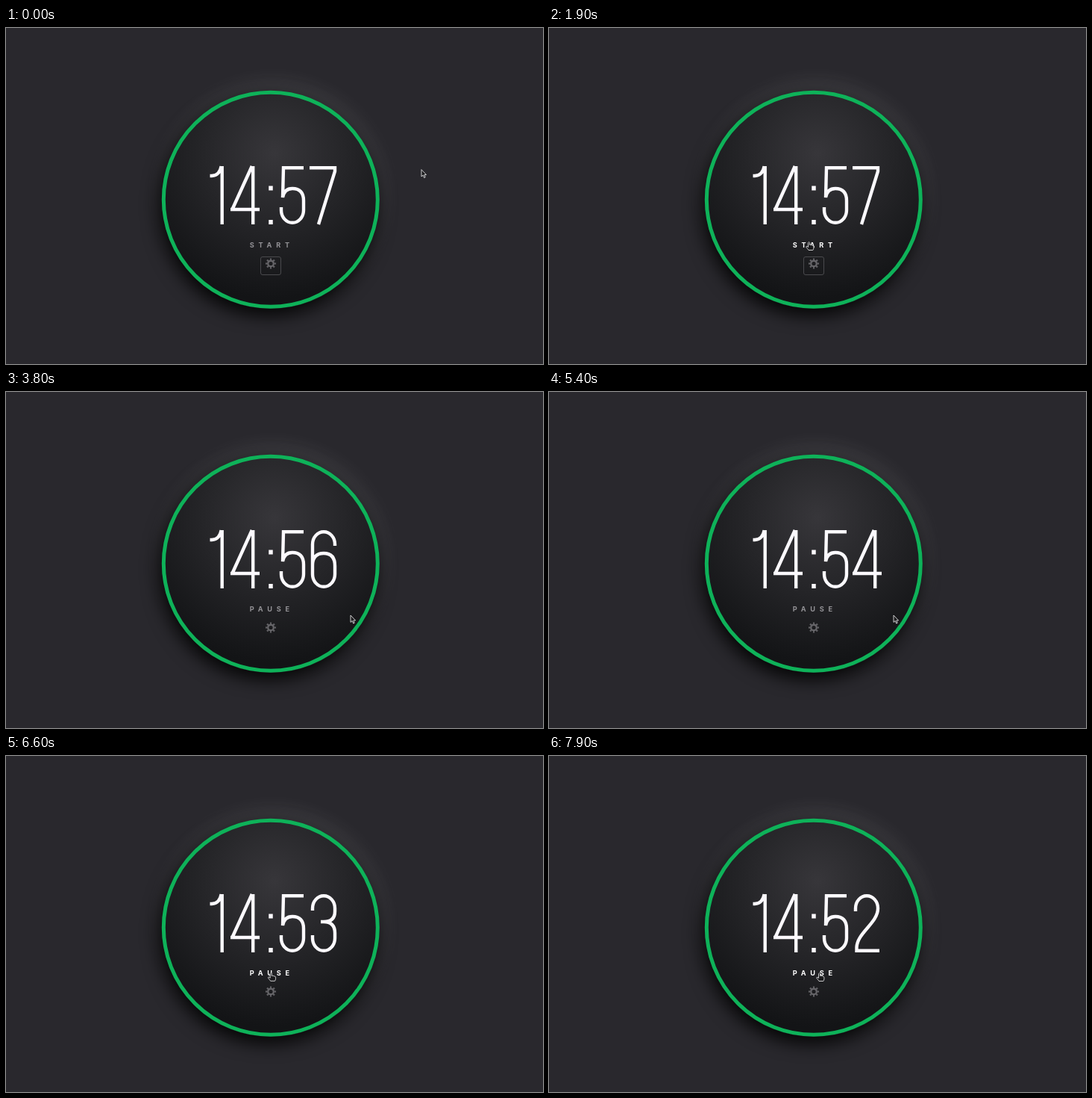
These frames come from a looping animation (720 px wide and 450 px high, 8000 ms). An HTML page:

```html
<!DOCTYPE html>
<html lang="en">
<head>
<meta charset="utf-8">
<title>Round timer</title>
<style>
  html, body { margin: 0; width: 100%; height: 100%; overflow: hidden; background: #29282d; }
  .stage { position: relative; width: 720px; height: 450px; overflow: hidden; }
  .dial {
    position: absolute; left: 209px; top: 84px; width: 292px; height: 292px; border-radius: 50%;
    background: radial-gradient(67% 67% at 51.7% 28.6%, #37363a 0%, #131416 100%);
    box-shadow: -3px 8px 25px #000, 3px -9px 28px rgba(255, 255, 255, .13);
  }
  svg { position: absolute; left: 0; top: 0; }
  #time { fill: none; stroke: #fbf9fd; stroke-width: 4.4; }
  #label { font: 700 9.2px Inter, "Open Sans", sans-serif; letter-spacing: 5.8px; text-anchor: middle; }
  #gear { fill: none; }
  #cursor { fill: #1b1b1d; stroke: #dededf; stroke-width: .9; stroke-linejoin: round; }
</style>
</head>
<body>
<div class="stage">
  <div class="dial"></div>
  <svg width="720" height="450" viewBox="0 0 720 450">
    <circle cx="354.8" cy="229.8" r="143.5" fill="none" stroke="#0eb259" stroke-width="5"/>
    <g id="time" role="img">
      <path id="d0" transform="translate(273 185)"/>
      <path id="d1" transform="translate(303 185)"/>
      <path d="M355 211.5v6M355 257v6" stroke-width="5.5"/>
      <path id="d2" transform="translate(367 185)"/>
      <path id="d3" transform="translate(409 185)"/>
    </g>
    <text id="label" x="356.3" y="293.5"></text>
    <rect id="focus" x="341.5" y="306.5" width="27" height="24" rx="2.5" fill="none" stroke="#505053" stroke-width=".9"/>
    <g id="gear">
      <circle cx="355" cy="315.5" r="3.8" stroke-width="2.4"/>
      <circle cx="355" cy="315.5" r="5.8" stroke-width="2.4" pathLength="16"
              stroke-dasharray=".9 1.1" stroke-dashoffset=".45"/>
    </g>
    <g id="cursor">
      <path id="arrow" d="M0 0V9.4L2.2 7.5 3.7 11 5.2 10.3 3.8 7H6.6Z"/>
      <path id="hand" d="M-1 1Q0 -1 1 1V4Q2 3.4 3 4.2 4.2 3.8 4.8 4.8 6.2 4.6 6.4 6V8.3Q6.3 9.6 5.3 11H-.5Q-1.5 9.3 -3.6 7.2 -4 5.6 -2.4 5.8L-1 7Z"/>
    </g>
  </svg>
</div>
<script>
const LOOP = 8000, STEP = 100, CLICK = 2200, START = 2400;
const $ = id => document.getElementById(id);

// Digit strokes, 78 high, built on shared half-round caps
const arc = (dx, sweep) => `a15 16.8 0 0 ${sweep} ${dx} 0`;
const OVER = arc(30, 1), UNDER = arc(-30, 1);
const GLYPHS = {
  1: 'M.5 13H3Q13.5 12.5 15.6 0M16.7 0V78',
  2: `M2 23V19${OVER}c0 20 -28.5 33 -28.5 53V75.8H34`,
  3: `M2 22V19${OVER}v4q0 14 -15 14h-4m4 0q15 0 15 15v7${UNDER}v-4`,
  4: 'M28.2 78V0M26.8 0L.8 57M-2 58H37',
  5: `M32 2.2H5L4 42q2 -12 13 -12q15 0 15 16V59${UNDER}v-4`,
  6: `M32 21V19${arc(-30, 0)}V59${arc(30, 0)}V48q0 -17 -15 -17t-15 16`,
  7: 'M-2 2.2H32V7L10 78'
};

// Pointer moves: start, end, x, y
const REST = [557, 189.6];
const MOVES = [
  [300, 700, 379, 286], [800, 900, 348.5, 286.5], [3000, 3800, 462, 299],
  [5600, 5800, 448, 297.5], [5900, 6700, 351, 290], [7000, 7300, 355.5, 307],
  [7500, 7700, 360, 289], [7800, 7900, 362.5, 290.5]
];

function pointer(t) {
  return MOVES.reduce(([x, y], [from, to, tx, ty]) => {
    const p = Math.min(1, Math.max(0, (t - from) / (to - from)));
    const e = p * p * (3 - 2 * p);
    return [x + (tx - x) * e, y + (ty - y) * e];
  }, REST);
}

const inside = (x, y, l, t, r, b) => x >= l && x <= r && y >= t && y <= b;
const show = (id, on) => $(id).setAttribute('visibility', on ? 'visible' : 'hidden');

function draw(time) {
  const t = Math.floor((time % LOOP) / STEP) * STEP;
  const running = t >= START;
  const secs = 57 - (running ? Math.floor((t - START) / 1000) : 0);

  [...`14${secs}`].forEach((n, i) => $('d' + i).setAttribute('d', GLYPHS[n]));
  $('time').setAttribute('aria-label', `14:${secs}`);

  const [x, y] = pointer(t);
  const onLabel = inside(x, y, 322, 281, 388, 300);
  const onGear = inside(x, y, 341, 306, 369, 331);
  $('label').textContent = running ? 'PAUSE' : 'START';
  $('label').setAttribute('fill', onLabel ? '#fff' : '#939296');
  $('gear').setAttribute('stroke', onGear ? '#fff' : '#656468');
  show('focus', t < CLICK);
  show('hand', onLabel || onGear);
  show('arrow', !onLabel && !onGear);
  $('cursor').setAttribute('transform', `translate(${x} ${y})`);
}

function tick() {
  draw(performance.now());
  requestAnimationFrame(tick);
}
tick();
</script>
</body>
</html>
```
